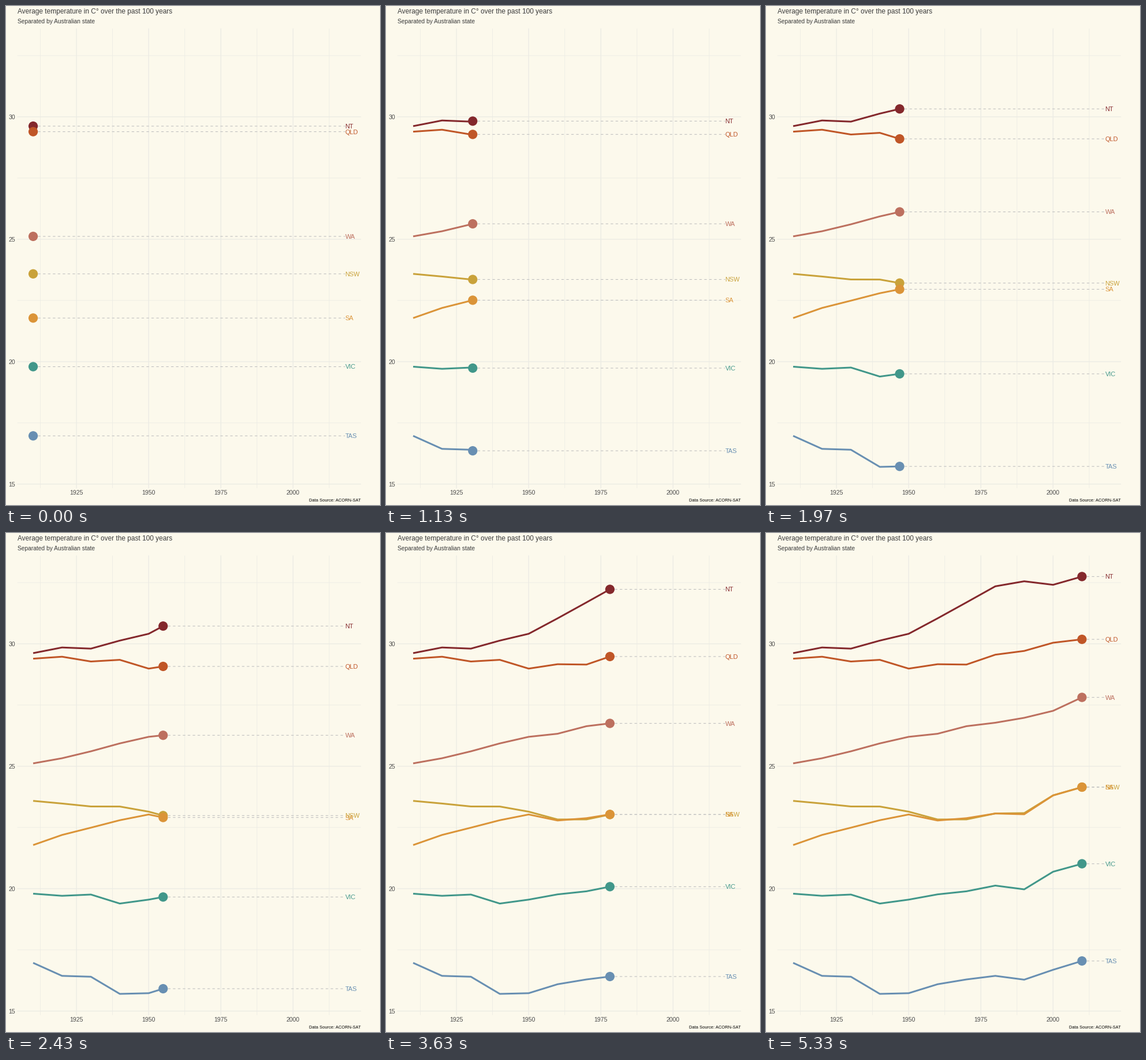
A matplotlib script for the animation above (8000 ms loop, 648 by 864 pixels).

```python
import numpy as np
import matplotlib.pyplot as plt
from matplotlib.animation import FuncAnimation
from matplotlib.patches import Circle

WIDTH, HEIGHT, DPI = 648, 864, 72
FRAMES, MOVING = 240, 160
PAPER = "#FCF9EC"
LEFT, RIGHT, TOP, BOTTOM = 20, 614.5, 39.4, 834.4
LABEL_YEAR = 2018

plt.rcParams["font.family"] = "Liberation Sans"

# state: colour and the height in pixels of each decade, 1910 to 2010
STATES = {
    "NSW": ("#C9A23A", [463.8, 468.4, 473.5, 473.6, 482.5, 496, 495.9, 485.6, 485, 454.2, 440]),
    "NT": ("#84282C", [208, 198.2, 200.2, 186.3, 174.5, 147.8, 120.2, 92.3, 83.6, 89.7, 75.4]),
    "QLD": ("#C05627", [217.6, 214.2, 222.5, 219.6, 234.8, 227.2, 227.8, 210.7, 204.2, 190, 184.1]),
    "SA": ("#DB9438", [540.3, 522.8, 510.2, 497.3, 487.4, 497.8, 493.8, 485.7, 487, 454.4, 440]),
    "TAS": ("#688FB2", [744.3, 766.8, 768.3, 798, 796.8, 781.3, 773, 766.8, 773.4, 756.3, 741]),
    "VIC": ("#41978A", [624.5, 628.2, 626, 641.6, 634.8, 625.7, 620.4, 610.5, 617, 586.5, 572.7]),
    "WA": ("#BD705F", [398.9, 390, 378, 364.3, 352.9, 347.6, 334.5, 328.5, 320, 307.9, 284.6]),
}
# each decade falls on a whole frame
KEY_FRAMES = np.round(np.linspace(0, MOVING - 1, 11))


def year_x(year):
    return 47.05 + (year - 1910) * 5.004


def temp_y(temp):
    return 191.9 + (30 - temp) * 42.39


DECADE_X = year_x(np.arange(1910, 2011, 10))
LABEL_X = year_x(LABEL_YEAR)

fig = plt.figure(figsize=(WIDTH / DPI, HEIGHT / DPI), dpi=DPI, facecolor=PAPER)
ax = fig.add_axes([0, 0, 1, 1])
ax.set_xlim(0, WIDTH)
ax.set_ylim(HEIGHT, 0)
ax.axis("off")


def write(x, y, text, size, color, ha="left"):
    return ax.text(x, y, text, fontsize=size, color=color, ha=ha, va="baseline", zorder=5)


def grid(xs, ys, width):
    style = dict(color="#EBEBE4", lw=width, snap=False, zorder=1)
    for x in xs:
        ax.plot([x, x], [TOP, BOTTOM], **style)
    for y in ys:
        ax.plot([LEFT, RIGHT], [y, y], **style)


major_years, major_temps = np.arange(1925, 2001, 25), np.arange(15, 31, 5)
grid(year_x(np.arange(1912.5, 2013, 25)), temp_y(np.arange(17.5, 33, 5)), 0.75)
grid(year_x(major_years), temp_y(major_temps), 1.3)
for year in major_years:
    write(year_x(year), 845.7, str(year), 10.5, "#4D4D4D", "center")
for temp in major_temps:
    write(16, temp_y(temp) + 3.8, str(temp), 10.5, "#4D4D4D", "right")

write(LEFT, 13.4, "Average temperature in C° over the past 100 years", 11.9, "#3C3C3C")
write(LEFT, 30.5, "Separated by Australian state", 10.2, "#3C3C3C")
write(RIGHT, 857.7, "Data Source: ACORN-SAT", 7.5, "black", "right")


class Series:
    def __init__(self, name, color, heights):
        self.heights = np.array(heights)
        self.lead, = ax.plot([], [], color="#BEBEBE", lw=1.067, ls=(0, (4, 4)),
                             snap=False, zorder=2)
        self.line, = ax.plot([], [], color=color, lw=3, solid_capstyle="butt",
                             snap=False, zorder=3)
        self.dot = ax.add_patch(Circle((0, 0), 8.1, fc=color, lw=0, zorder=4))
        self.label = write(LABEL_X, 0, name, 11, color)

    def update(self, frame):
        x = np.interp(frame, KEY_FRAMES, DECADE_X)
        y = np.interp(frame, KEY_FRAMES, self.heights)
        passed = KEY_FRAMES < frame
        self.line.set_data(np.append(DECADE_X[passed], x),
                           np.append(self.heights[passed], y))
        self.lead.set_data([x, LABEL_X], [y, y])
        self.dot.center = x, y
        self.label.set_y(y + 3.95)


series = [Series(name, *spec) for name, spec in STATES.items()]


def draw(frame):
    for s in series:
        s.update(min(frame, MOVING - 1))
    return []


anim = FuncAnimation(fig, draw, frames=FRAMES, interval=8000 / FRAMES,
                     init_func=lambda: draw(0), repeat=True, repeat_delay=0)
plt.show()
```
